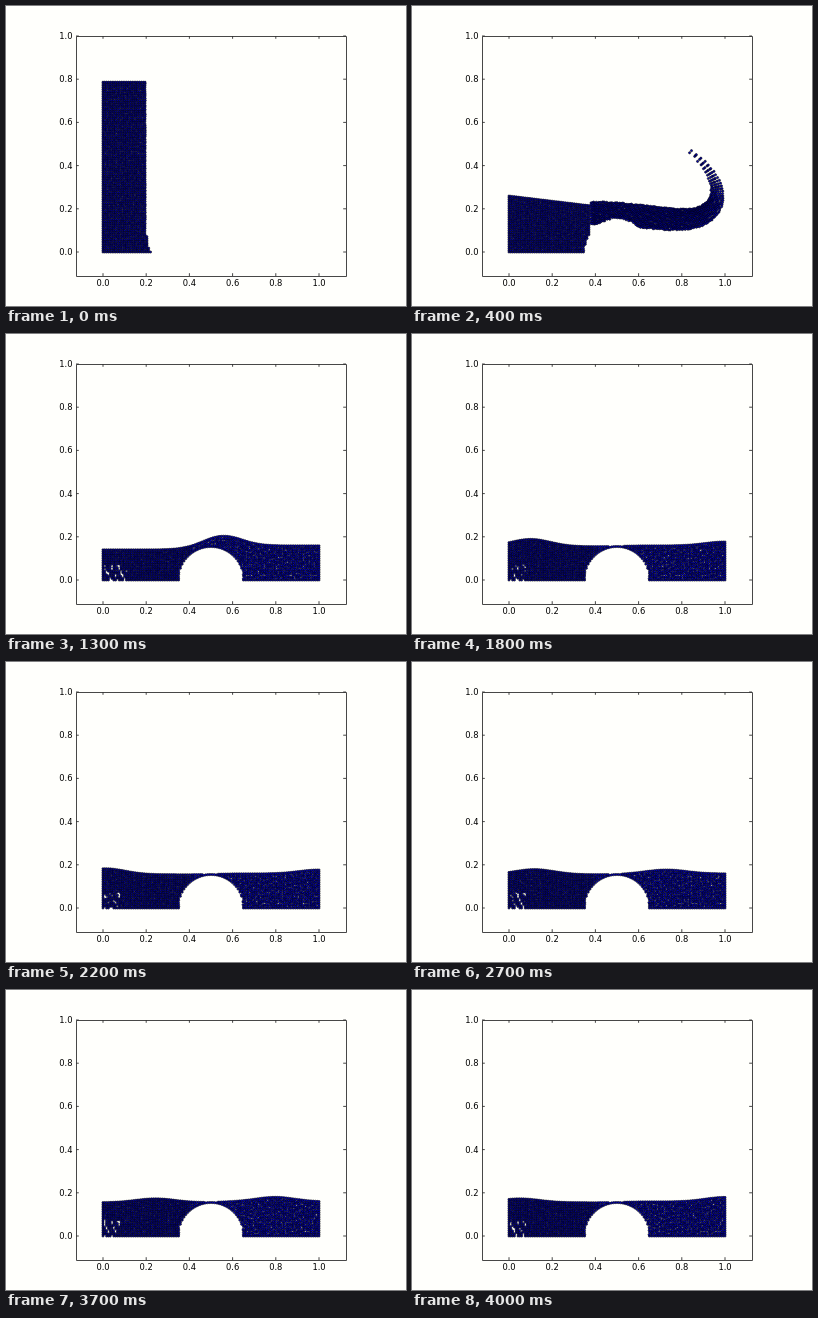
Recreate the animation shown at these times as an HTML page with a canvas. Size 400x300 px, loop 4100 ms.

```html
<!DOCTYPE html>
<html lang="en">
<head>
<meta charset="utf-8">
<title>Dam break over a bump</title>
<style>
  html, body { margin: 0; width: 100%; height: 100%; overflow: hidden; background: #fffffc; }
  canvas, svg { position: absolute; left: 0; top: 0; width: 400px; height: 300px; }
  text { font: 8.33px "DejaVu Sans", sans-serif; fill: #000; }
  path { fill: none; stroke: #333; stroke-width: .9; }
</style>
</head>
<body>
<canvas id="fluid" width="400" height="300"></canvas>
<svg id="axes" viewBox="0 0 400 300"></svg>
<script>
const SCALE = 216, STEP = 100, STEPS = 41, GAP = 1.8;
const GRAVITY = .08; // per step squared
const px = x => 97 + x * SCALE;
const py = y => 246 - y * SCALE;
const ctx = document.getElementById('fluid').getContext('2d');

const noise = (a, b) => {
  const s = Math.sin(a * 12.9898 + b * 78.233) * 43758.5453;
  return s - Math.floor(s);
};
const bell = (d, width) => Math.exp(-((d / width) ** 2));
const smooth = (a, b, v) => {
  const t = Math.min(1, Math.max(0, (v - a) / (b - a)));
  return t * t * (3 - 2 * t);
};

// Linear path through a few [step, position] points
function track(points, k) {
  let i = 1;
  while (i < points.length - 1 && points[i][0] < k) i++;
  const [k0, p0] = points[i - 1], [k1, p1] = points[i];
  return p0 + (p1 - p0) * (k - k0) / (k1 - k0);
}

// Crests that run across the pool and bounce off the walls
const mainCrest = [[6, 1], [9, .9], [18, .1], [21, 0], [26, .05], [40, 1]];
const sideCrest = [[9, 1.5], [18, 1], [22, 1], [27, .73], [33, .5], [40, .05]];

const bump = x => {
  const d = Math.abs(x - .5);
  return d < .15 ? Math.sqrt(.0225 - d * d) + .005 : 0;
};

const dropLevel = k => .14 + .65 * bell(k, 3.1) + .018 * smooth(11, 18, k);

// Surface of the column while it collapses
function columnTop(x, k) {
  const toe = .02 + .14 * k, slope = Math.min(.2, .04 + .08 * k);
  const level = dropLevel(k) - .12 * x * smooth(1, 4, k);
  return x <= .2 ? level : Math.min(level, slope * Math.log(toe / (x - .2)));
}

// Surface of the pool once it reaches the far wall
function poolTop(x, k) {
  const left = dropLevel(k), right = .148 + .014 * smooth(7, 12, k);
  const level = left + (right - left) * smooth(.4, .65, x);
  const overBump = .03 * (1 - smooth(9, 14, k)) * bell(x - .5, .12);
  const main = (.02 + .05 * Math.exp((9 - k) / 7)) * bell(x - track(mainCrest, k), .13);
  const side = .018 * bell(x - track(sideCrest, k), .13);
  return level + overBump + (k > 5 ? main + side : 0);
}

// Air trapped under the overturning wave
function inPocket(x, y, k) {
  if (k < 6 || k > 10) return false;
  const dx = x - .68 - .04 * (k - 6), dy = y - .05 - .016 * (k - 6);
  const rx = .06, ry = k > 9 ? .035 : .05;
  return (dx / rx) ** 2 + ((dy - dx * .3) / ry) ** 2 < 1;
}

function dot(x, y, fill) {
  ctx.beginPath();
  ctx.arc(px(x), py(y), 1.1, 0, 7);
  ctx.fillStyle = fill;
  ctx.fill();
  ctx.stroke();
}

function drawPool(k) {
  const end = k < 5 ? Math.min(.2 + .02 + .14 * k, .37) : k < 6 ? .5 : 1;
  const reach = k < 6 ? 0 : .08 + .2 * bell(k - 9, 3);
  const cols = Math.round(end * SCALE / GAP);
  for (let i = 0; i <= cols; i++) {
    const x = end * i / cols, lo = bump(x);
    const hi = (k < 5 ? columnTop(x, k) : poolTop(x, k)) - .004;
    const rows = Math.max(0, Math.round((hi - lo) * SCALE / GAP));
    for (let j = 0; j <= rows; j++) {
      const y = rows ? lo + (hi - lo) * j / rows : lo;
      if (inPocket(x, y, k)) continue;
      const streak = ((x + y * .6 - y * y * 2) / .032 + 9) % 1;
      if (x > .008 && x < reach && y < .075 - x * .1 && streak < .33 && noise(i + k, j) < .75) continue;
      const inner = i && i < cols && j && j < rows;
      const spread = inner ? (x > .4 ? .0045 : .002) : 0;
      const dx = (noise(i, j + k) - .5) * spread, dy = (noise(j, i - k) - .5) * spread;
      dot(x + dx, y + dy, x > .4 ? '#0000d0' : '#0000a8');
    }
  }
}

// Dots across a ribbon; at(t) gives [x, y, half thickness] for t in 0..1
function drawRibbon(at, count) {
  for (let i = 0; i <= count; i++) {
    const t = i / count, [x, y, r] = at(t);
    const [x0, y0] = at(Math.max(0, t - .01)), [x1, y1] = at(Math.min(1, t + .01));
    const len = Math.hypot(x1 - x0, y1 - y0) || 1;
    const nx = (y0 - y1) / len, ny = (x1 - x0) / len;
    const across = Math.max(1, Math.round(2 * r * SCALE / GAP));
    for (let j = 0; j <= across; j++) {
      const o = r * (2 * j / across - 1) + (noise(i, j) - .5) * .006;
      const qx = Math.min(1, x + nx * o), qy = Math.max(0, y + ny * o);
      if (qy >= bump(qx)) dot(qx, qy, '#0000b4');
    }
  }
}

// Parcels leave the bump one after another and fly ballistically
function drawJet(k) {
  const first = 1.8;
  const at = t => {
    const since = t * (k - first), age = k - first - since;
    const vx = .325 - .115 * Math.exp(-since / .17), vy = .218 * Math.exp(-since / .45);
    const r = .006 + .044 * (1 - Math.exp(-since / .4));
    const x = .38 + vx * age, y = .18 + vy * age - GRAVITY / 2 * age * age;
    return [Math.min(x, 1 - r), Math.max(y, r), r];
  };
  drawRibbon(at, Math.ceil((k - first) * 55));
}

function drawTongue() {
  drawRibbon(t => [.62 + .125 * t, .155 + .08 * t ** 1.5, .02 - .009 * t], 18);
}

// Thin spray thrown up the right wall, falling back under gravity
function drawSpray(k) {
  const top = .77 - GRAVITY / 2 * (k - 8.2) ** 2;
  for (let i = 0; i < 22; i++) {
    const y = top - (top - .16) * (i / 21) ** 4;
    if (y > .1) dot(1 - noise(i, 3) * .005, y, '#0000a8');
  }
}

function draw(k) {
  ctx.clearRect(0, 0, 400, 300);
  ctx.strokeStyle = '#000';
  ctx.lineWidth = .6;
  drawPool(k);
  if (k > 1 && k < 6) drawJet(k);
  if (k === 8 || k === 9) drawTongue();
  if (k > 5 && k < 12) drawSpray(k);
}

function drawAxes() {
  let ticks = 'M70.5 30.5H340.5V270.5H70.5Z', labels = '';
  for (let i = 0; i <= 5; i++) {
    const x = px(i / 5), y = py(i / 5), name = (i / 5).toFixed(1);
    ticks += `M${x} 270v-2.8M${x} 30v2.8M70 ${y}h2.8M340 ${y}h-2.8`;
    labels += `<text x="${x}" y="280" text-anchor="middle">${name}</text>` +
      `<text x="66.5" y="${y + 3}" text-anchor="end">${name}</text>`;
  }
  document.getElementById('axes').innerHTML = `<path d="${ticks}"/>${labels}`;
}

let shown = -1;
const start = performance.now();
function tick() {
  const k = Math.floor((performance.now() - start) / STEP) % STEPS;
  if (k !== shown) draw(shown = k);
  requestAnimationFrame(tick);
}

drawAxes();
tick();
</script>
</body>
</html>
```
